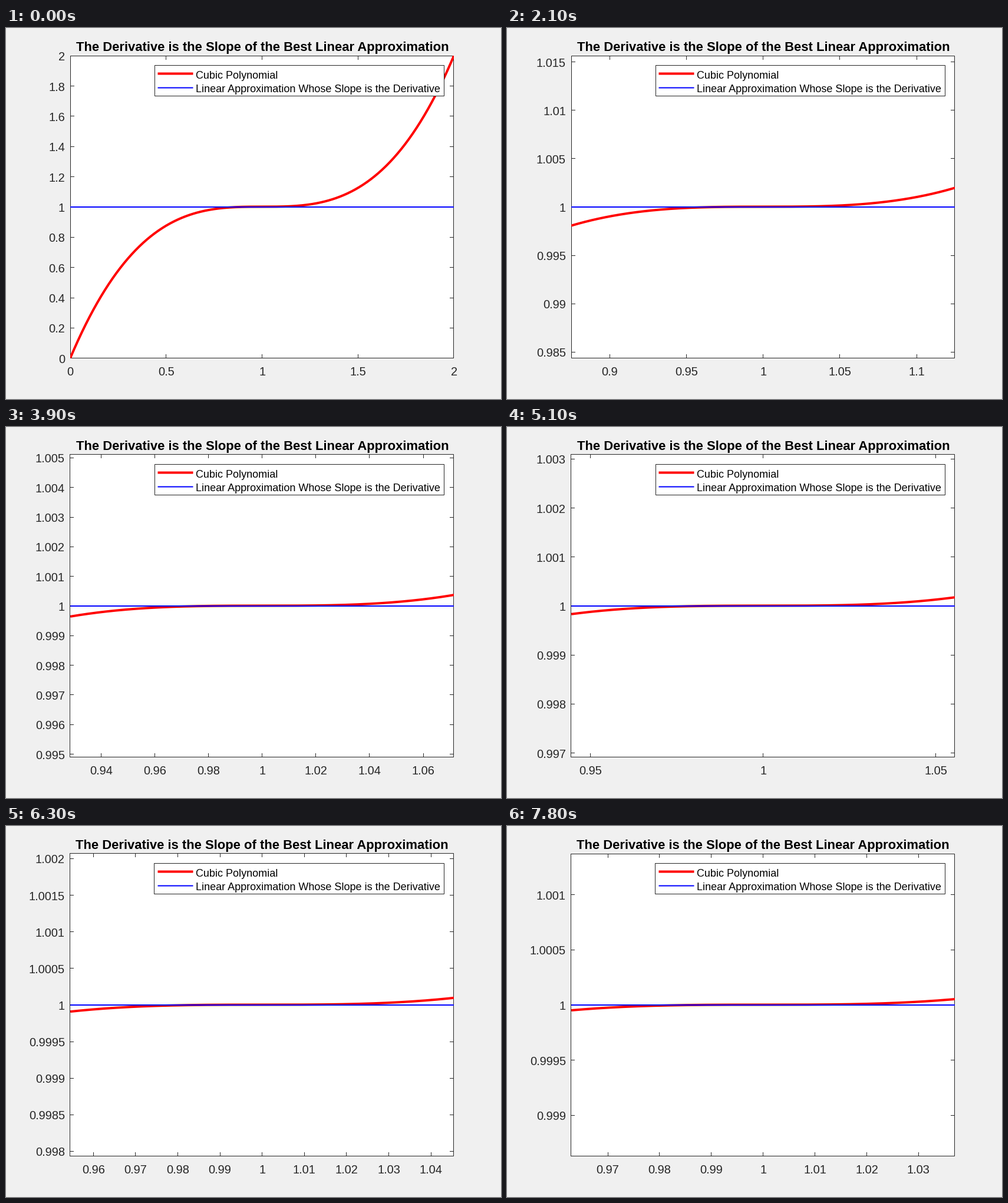
Animation, 840 px wide and 630 px high, one loop 8000 ms. Source, as a matplotlib script:

```python
import math

import matplotlib.pyplot as plt
import numpy as np
from matplotlib.animation import FuncAnimation
from matplotlib.collections import LineCollection
from matplotlib.patches import Rectangle

W, H, DPI = 840, 630, 100
PX = 72 / DPI  # points per pixel
LEFT, TOP = 0.13 * W, 0.075 * H
WIDTH, HEIGHT = 0.775 * W, 0.815 * H
RIGHT, BOTTOM = LEFT + WIDTH, TOP + HEIGHT
INK = "#262626"
TICK = 6.5
LABEL = 20
POOL = 14  # most tick labels on one axis

plt.rcParams["font.family"] = "Liberation Sans"
fig = plt.figure(figsize=(W / DPI, H / DPI), dpi=DPI, facecolor="#f0f0f0")
ax = fig.add_axes([0, 0, 1, 1])
ax.set_xlim(0, W)
ax.set_ylim(H, 0)
ax.axis("off")


def write(x, y, text, size, color="black", **kw):
    return ax.text(x, y, text, fontsize=size * PX, color=color,
                   va="baseline", zorder=8, **kw)


def stroke(xs, ys, color, width, z):
    line, = ax.plot(xs, ys, color=color, lw=width * PX, zorder=z,
                    solid_capstyle="butt", snap=False)
    return line


def frame_box(x, y, right, bottom, z):
    box = Rectangle((x, y), right - x, bottom - y, facecolor="white",
                    edgecolor=INK, lw=PX, zorder=z, snap=False)
    return ax.add_patch(box)


def tick_step(span, horizontal):
    """Smallest 1-2-5 step giving few enough ticks, coarser if crowded."""
    power = 10.0 ** math.floor(math.log10(span / 11.5))
    steps = [base * power for base in (1, 2, 5, 10, 50)]
    i = next(i for i, step in enumerate(steps) if span / step <= 11.5)
    if horizontal and span / steps[i] > 9.6:
        i = 2 if i < 2 else i + 1
    return steps[i]


def ticks(half, horizontal):
    step = tick_step(2 * half, horizontal)
    count = math.floor(half / step + 1e-6)
    return [1 + i * step for i in range(-count, count + 1)]


def label_of(value):
    text = f"{round(value, 6):.8g}"
    advance = sum(0.278 if c == "." else 0.556 for c in text) * LABEL
    return text, advance


def center(pixel):
    return math.floor(pixel) + 0.5


plot_box = frame_box(109.5, 47.5, 759.5, 560.5, 1)
tick_marks = LineCollection([], colors=INK, linewidths=PX, zorder=2,
                            snap=False)
ax.add_collection(tick_marks)
clip = Rectangle((109, 47), 651, 514, transform=ax.transData)
cubic = stroke([], [], "red", 4, 3)
cubic.set_clip_path(clip)
stroke([109, 760], [304, 304], "blue", 2, 4)

legend_box = frame_box(252.5, 63.5, 743.5, 115.5, 6)
stroke([257.5, 317.5], [77.5, 77.5], "red", 4, 7)
stroke([257.5, 317.5], [101.5, 101.5], "blue", 2, 7)
write(322, 86, "Cubic Polynomial", 18)
write(322, 109, "Linear Approximation Whose Slope is the Derivative", 18)
title = write(435, 39, "The Derivative is the Slope of the Best Linear "
              "Approximation", 22, weight="bold", ha="center")
x_labels = [write(0, 0, "", LABEL, INK) for _ in range(POOL)]
y_labels = [write(0, 0, "", LABEL, INK) for _ in range(POOL)]
u = np.linspace(-1, 1, 401)


def update(frame):
    n = frame // 3 + 1
    half_x, half_y = 1 / n, 1 / n ** 2

    # Pixel rounding moves the boxes and title slightly as the range shrinks.
    x0 = 109.5 if n < 9 else 108.5
    y0 = 46.5 if 9 <= n <= 24 else 47.5
    plot_box.set_bounds(x0, y0, 759.5 - x0, 560.5 - y0)
    legend_x = 252.5 if n < 20 else 251.5
    legend_box.set_bounds(legend_x, 63.5, 743.5 - legend_x, 52)
    title.set_x(435 if n < 20 else 434)

    height = (u * half_x) ** 3 / half_y
    cubic.set_data(LEFT + WIDTH * (u + 1) / 2,
                   TOP + HEIGHT * (1 - height) / 2 - 0.5)

    for label in x_labels + y_labels:
        label.set_text("")
    marks = []
    for value, label in zip(ticks(half_x, True), x_labels):
        x = LEFT + WIDTH * ((value - 1) / half_x + 1) / 2
        text, advance = label_of(value)
        label.set_text(text)
        label.set_position((x - advance / 2, 590))
        x = min(max(center(x), x0), 759.5)
        marks += [[(x, 560.5), (x, 560.5 - TICK)], [(x, y0), (x, y0 + TICK)]]
    for value, label in zip(ticks(half_y, False), y_labels):
        y = BOTTOM - HEIGHT * ((value - 1) / half_y + 1) / 2
        text, advance = label_of(value)
        label.set_text(text)
        label.set_position((100 - advance, round(y) + 8))
        y = min(max(center(y), y0), 560.5)
        marks += [[(x0, y), (x0 + TICK, y)], [(759.5, y), (759.5 - TICK, y)]]
    tick_marks.set_segments(marks)
    return []


animation = FuncAnimation(fig, update, frames=80, interval=100,
                          repeat=True, repeat_delay=0, blit=False)
plt.show()
```
